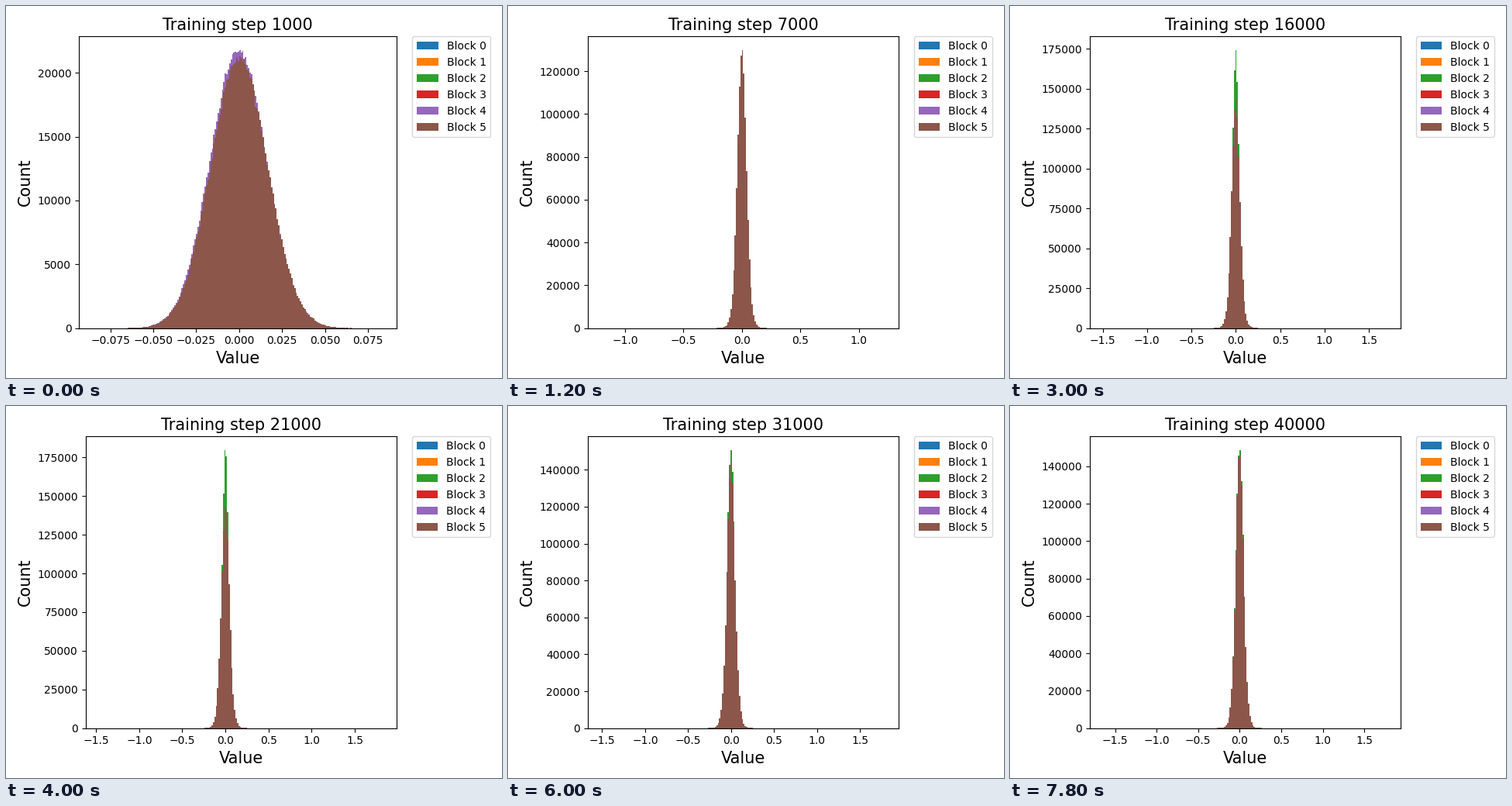
Recreate the animation shown at these times as a matplotlib script. Size 640 by 480 pixels, loop 8000 ms.

```python
import numpy as np
import matplotlib.pyplot as plt
from matplotlib.animation import FuncAnimation
from matplotlib.patches import Patch

FRAMES = 40
BINS = 200
WEIGHTS = 2 ** 20  # values per block

# Key points: step in thousands, left and right axis limit, tallest bar.
KEYS = np.array([
    (1, -.0933, .0917, 21760),
    (7, -1.318, 1.338, 128500),
    (12, -1.666, 1.753, 169500),
    (21, -1.620, 1.985, 179500),
    (27, -1.580, 1.900, 159000),
    (31, -1.667, 1.949, 150500),
    (40, -1.805, 1.937, 148500),
]).T


def bell(x, sigma):
    return np.exp(-.5 * (x / sigma) ** 2) / sigma / np.sqrt(2 * np.pi)


def counts(edges, center, sigma, tail, rng):
    """Random histogram; tail goes from 0 (normal) to 1 (heavy tails)."""
    x = (edges[:-1] + edges[1:]) / 2 - center
    heavy = (.59 * bell(x, .9 * sigma) + .395 * bell(x, 1.25 * sigma)
             + .015 * bell(x, 2.6 * sigma))
    density = (1 - tail) * bell(x, sigma) + tail * heavy
    return rng.poisson(WEIGHTS * (edges[1] - edges[0]) * density)


fig, ax = plt.subplots(figsize=(6.4, 4.8), dpi=100)
ax.set_xlabel("Value", fontsize=15)
ax.set_ylabel("Count", fontsize=15)
title = ax.set_title("", fontsize=15)
ax.legend(handles=[Patch(color=f"C{i}", linewidth=0, label=f"Block {i}")
                   for i in range(6)],
          bbox_to_anchor=(1.05, 1), loc="upper left", borderaxespad=0)

start = np.linspace(-1, 1, BINS + 1)
lead = ax.stairs(np.zeros(BINS), start, fill=True, color="C4", linewidth=0)
last = ax.stairs(np.zeros(BINS), start, fill=True, color="C5", linewidth=0)


def draw(frame):
    step = frame + 1
    rng = np.random.default_rng(step)
    left, right, peak = (np.interp(step, KEYS[0], row) for row in KEYS[1:])
    margin = (right - left) / 22
    edges = np.linspace(left + margin, right - margin, BINS + 1)
    width = edges[1] - edges[0]

    # The spread grows and settles; a taller block must be a narrower one.
    tail = min((step - 1) / 3, 1)
    sigma = .047 - .0304 * np.exp(-(step - 1) / 5)
    narrow = min(sigma, (.41 - .02 * tail) * WEIGHTS * width / peak)

    tall = counts(edges, -.0004 * (1 - tail), narrow, tail, rng)
    wide = counts(edges, 0, sigma, tail, rng)
    lead.set_data(tall * peak / tall.max(), edges)
    lead.set_color("C4" if step < 7 else "C2")
    last.set_data(wide, edges)

    ax.set_xlim(left, right)
    ax.set_ylim(0, 1.05 * max(peak, wide.max()))
    title.set_text(f"Training step {step * 1000}")
    fig.subplots_adjust(left=.16, right=.7875, bottom=.134, top=.918)
    fig.tight_layout()
    return lead, last, title


anim = FuncAnimation(fig, draw, frames=FRAMES, interval=200,
                     init_func=lambda: draw(0), repeat=True, repeat_delay=0)
plt.show()
```
